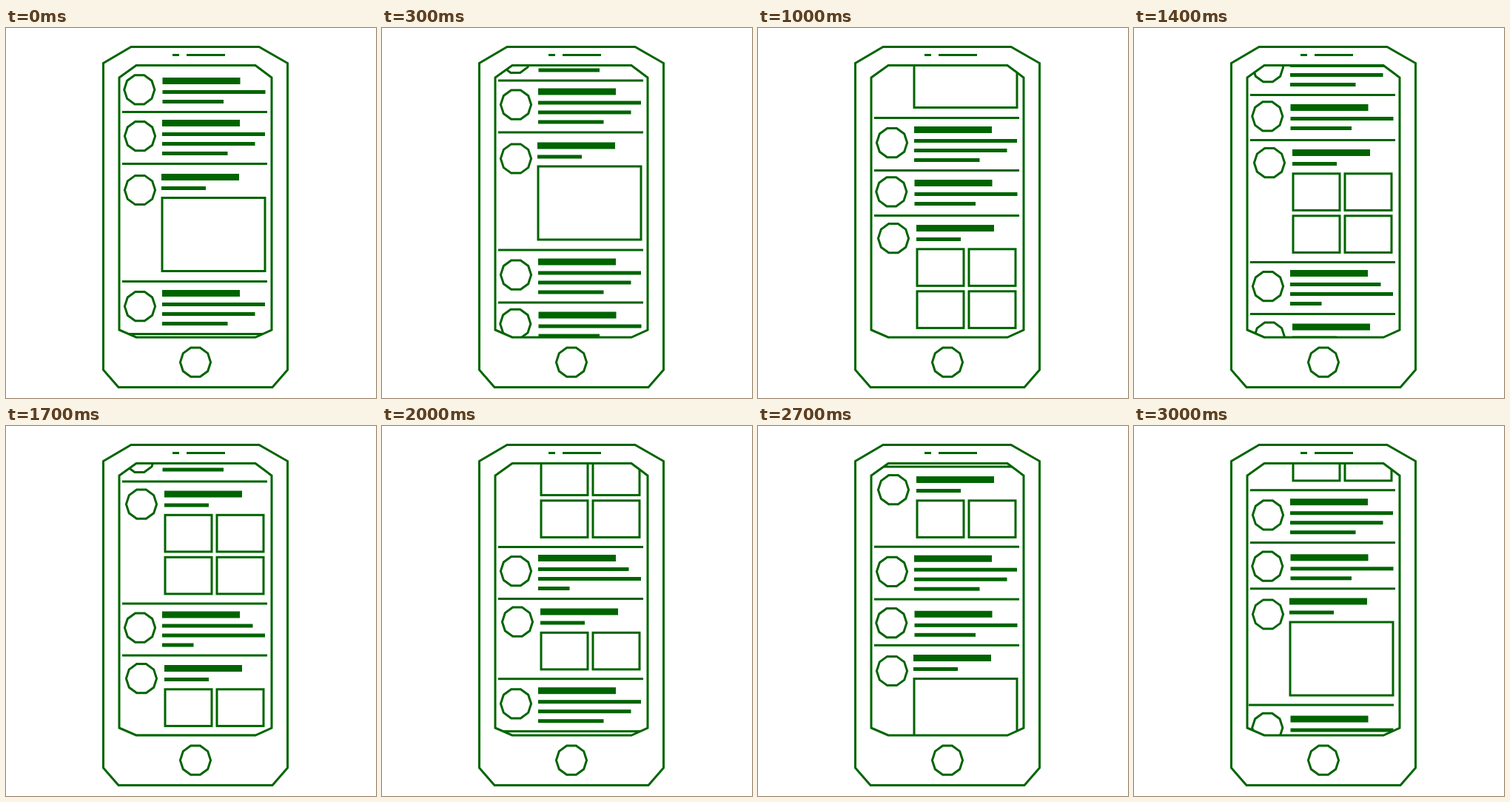
Recreate the animation shown at these times as an HTML page. Size 500 by 500 pixels, loop 3.1 s.

```html
<!DOCTYPE html>
<html lang="en">
<head>
<meta charset="utf-8">
<title>Scrolling feed</title>
<style>
html, body { margin: 0; width: 100%; height: 100%; overflow: hidden; background: #fff; }
svg { display: block; width: 100vw; height: 100vh; }
.line { fill: none; stroke: #006400; stroke-width: 3; }
.bar { fill: #006400; }
</style>
</head>
<body>
<svg viewBox="0 0 500 500">
  <defs>
    <clipPath id="screen"><polygon points="153,67 176,50.5 337,50.5 359,67 359,408 337,418 176,418 153,408"/></clipPath>
  </defs>
  <g clip-path="url(#screen)"><g id="feed"></g></g>
  <g id="phone">
    <polygon class="line" points="131.5,47.5 169,25.5 342,25.5 380.5,47.5 380.5,462 360,485.5 152,485.5 131.5,462"/>
    <polygon class="line" points="153,67 176,50.5 337,50.5 359,67 359,408 337,418 176,418 153,408"/>
    <path class="line" d="M225 36.5H234M244 36.5H296"/>
  </g>
</svg>
<script>
const LOOP = 3100, STEP = 100;
const SPEED = 0.255;   // px per ms
const RAMP = 800 / 3;  // ms of acceleration at the start
const feed = document.getElementById('feed');
const phone = document.getElementById('phone');

function add(parent, tag, attrs) {
  const el = document.createElementNS('http://www.w3.org/2000/svg', tag);
  for (const key in attrs) el.setAttribute(key, attrs[key]);
  parent.appendChild(el);
}

function decagon(parent, cx, cy) {
  const points = Array.from({ length: 10 }, (_, i) => {
    const a = i * Math.PI / 5;
    return (cx + 20.6 * Math.cos(a)).toFixed(2) + ',' + (cy + 20.6 * Math.sin(a)).toFixed(2);
  }).join(' ');
  add(parent, 'polygon', { class: 'line', points });
}

const bar = (x, y, width, height) =>
  add(feed, 'rect', { class: 'bar', x, y: y - height / 2, width, height });

const box = (x, y, width, height) =>
  add(feed, 'rect', { class: 'line', x, y, width, height });

const divider = (y, x = 157) => bar(x, y, 196, 3);

// A post: avatar, heading bar and text bars of the given widths.
function post(y, x, avatarX, avatarDy, widths) {
  decagon(feed, avatarX, y + avatarDy);
  bar(x, y, 105, 9);
  widths.forEach((w, i) => bar(x, y + 15 + 13 * i, w, 5));
}

const brief = y => post(y, 211.5, 180.3, 11.8, [139, 82.5]);
const text = (y, widths = [139, 125.5, 88.5]) => post(y, 211, 181, 17.6, widths);

function picture(y) {
  post(y, 210, 181, 17.5, [60]);
  box(211, y + 28, 139, 99);
}

function gallery(y, rows) {
  post(y, 214, 183, 13.7, [60]);
  for (let r = 0; r < rows; r++)
    for (const x of [215, 285]) box(x, y + 28.3 + 57 * r, 63, 49.6);
}

brief(71.5);
divider(113.5);
text(128.5);
divider(183.5);
picture(201.5);
divider(342.5);
text(358.5);
divider(413.5);
brief(430.5);
divider(474.5);
gallery(491.5, 2);
divider(639.5);
text(654.5, [122.5, 139, 42.5]);
divider(709.5);
gallery(727, 1);
divider(817.7);
text(833.7);
divider(888.6);
brief(908.8);
divider(950.8);
picture(968);
divider(1108, 155);
brief(1127);
decagon(phone, 256, 451.7);

function scrollAt(t) {
  return t < RAMP ? SPEED * t * t / (2 * RAMP) : SPEED * (t - RAMP / 2);
}

function draw(now) {
  const t = Math.floor((now % LOOP) / STEP) * STEP;
  feed.setAttribute('transform', `translate(0 ${-scrollAt(t).toFixed(2)})`);
}

function tick() {
  draw(performance.now());
  requestAnimationFrame(tick);
}
tick();
</script>
</body>
</html>
```
